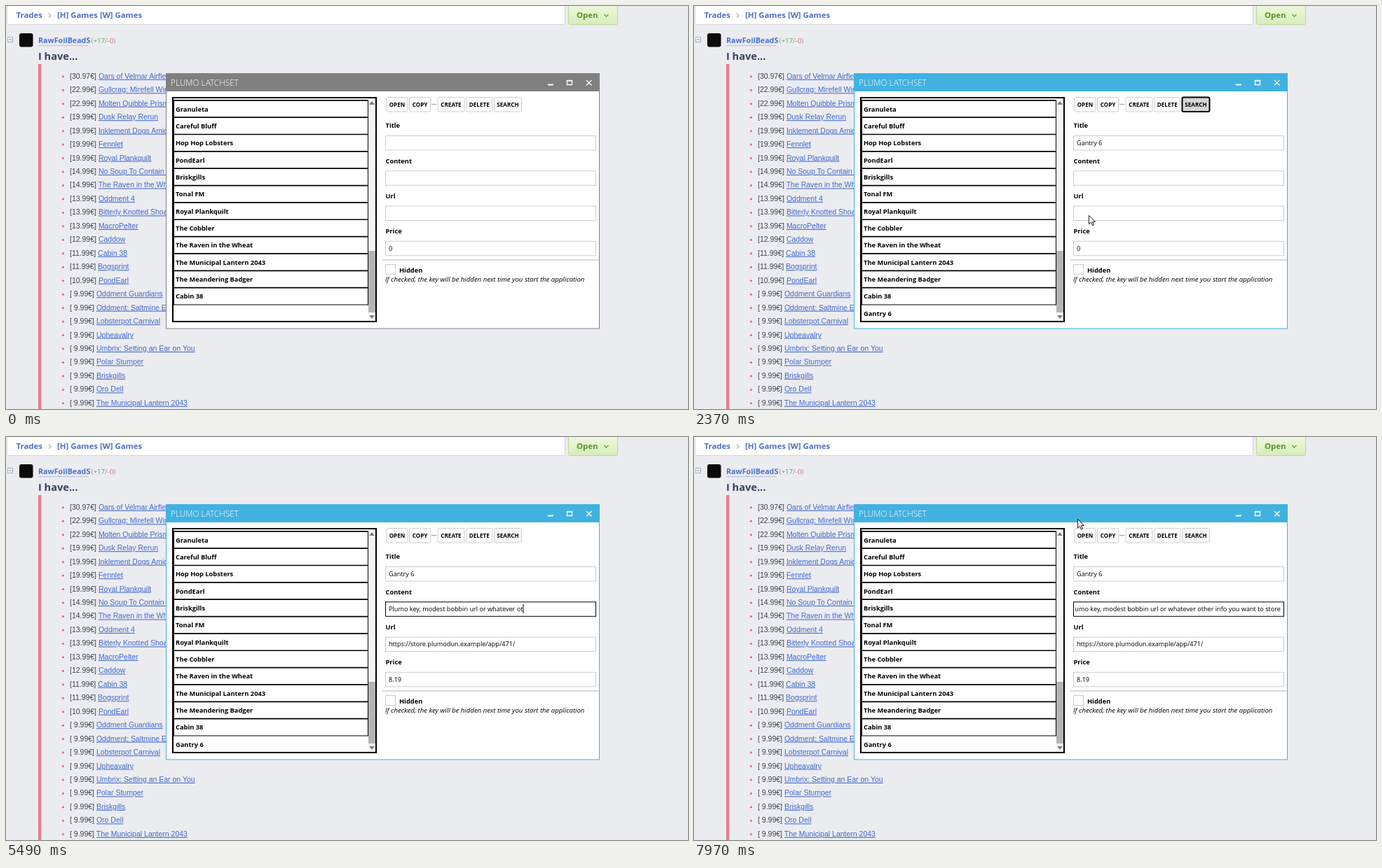
An HTML page for the animation above (8000 ms loop, 973 px wide and 576 px high).

```html
<!DOCTYPE html>
<html lang="en">
<head>
<meta charset="utf-8">
<title>Key manager</title>
<style>
  html, body { margin: 0; width: 100%; height: 100%; overflow: hidden; background: #ebecf0; }
  svg { display: block; --accent: #41b1e1; }
  text { white-space: pre; font: 9.15px "Open Sans", sans-serif; fill: #000; }
  .bold { font-weight: 700; font-size: 9.3px; }
  .button { font-weight: 700; font-size: 8.1px; text-anchor: middle; }
  .note { font-style: italic; font-size: 9.6px; }
  .caption { font-size: 11.8px; font-weight: 300; fill: #fff; }
  .page { font: 10.5px "Liberation Sans", Arial, sans-serif; fill: #3c424d; }
  .link { fill: #4268cd; text-decoration: underline; }
  .nav { font-size: 11.4px; font-weight: 700; fill: #4b6fca; }
  .user { font-size: 10.7px; font-weight: 700; fill: #4b6fca; }
  .votes { font-size: 9.7px; fill: #8a93a3; }
  .heading { font-size: 14.6px; font-weight: 700; fill: #36435c; }
</style>
</head>
<body>
<svg id="stage" width="973" height="576" viewBox="0 0 973 576"></svg>
<script>
const LOOP = 8000;
const TITLE = "Gantry 6";
const NOTE = "Plumo key, modest bobbin url or whatever other info you want to store";
const SEARCH_AT = 1810, FOUND_AT = 3160, ACTIVE_AT = 570;

const trades = [
  ["30.97", "Oars of Velmar Airfleet Collector's Edition"],
  ["22.99", "Gullcrag: Mirefell Winter"], ["22.99", "Molten Quibble Prism"],
  ["19.99", "Dusk Relay Rerun"], ["19.99", "Inklement Dogs Amid Us"],
  ["19.99", "Fennlet"], ["19.99", "Royal Plankquilt"],
  ["14.99", "No Soup To Contain Remade"], ["14.99", "The Raven in the Wheat"],
  ["13.99", "Oddment 4"], ["13.99", "Bitterly Knotted Shoals"],
  ["13.99", "MacroPelter"], ["12.99", "Caddow"], ["11.99", "Cabin 38"],
  ["11.99", "Bogsprint"], ["10.99", "PondEarl"],
  [" 9.99", "Oddment Guardians"], [" 9.99", "Oddment: Saltmine East"],
  [" 9.99", "Lobsterpot Carnival"], [" 9.99", "Upheavalry"],
  [" 9.99", "Umbrix: Setting an Ear on You"], [" 9.99", "Polar Stumper"],
  [" 9.99", "Briskgills"], [" 9.99", "Oro Dell"],
  [" 9.99", "The Municipal Lantern 2043"],
];
const keys = ["Granuleta", "Careful Bluff", "Hop Hop Lobsters", "PondEarl", "Briskgills",
  "Tonal FM", "Royal Plankquilt", "The Cobbler", "The Raven in the Wheat",
  "The Municipal Lantern 2043", "The Meandering Badger", "Cabin 38"];
const buttons = [["OPEN", 543, 30], ["COPY", 575.5, 30], ["CREATE", 616, 38],
  ["DELETE", 657, 36.5], ["SEARCH", 696.5, 39]];
const fields = [["Title", 185.5], ["Content", 235.8], ["Url", 286], ["Price", 336.3]];

const text = (x, y, cls, str, attrs = "") => `<text x="${x}" y="${y}" class="${cls}" ${attrs}>${str}</text>`;
const rect = (x, y, w, h, fill, attrs = "") =>
  `<rect x="${x}" y="${y}" width="${w}" height="${h}" fill="${fill}" ${attrs}/>`;
const path = (d, stroke, attrs = "") => `<path d="${d}" stroke="${stroke}" fill="none" ${attrs}/>`;

function drawPage() {
  const rows = trades.map(([price, name], i) => {
    const y = 103.8 + 19.46 * i;
    return `<circle cx="81.3" cy="${y - 3}" r="1.5" fill="#e0616f"/>` +
      text(91, y, "page", `[${price}€] <tspan class="link">${name}</tspan>`);
  });
  return `<linearGradient id="green" x2="0" y2="1"><stop stop-color="#f3f8e6"/><stop offset="1" stop-color="#d5edb8"/></linearGradient>` +
    rect(0, 0, 973, 576, "#ebecf0") +
    rect(1.5, -3.5, 796, 30, "#fff", 'stroke="#d3d6de" rx="2"') +
    text(14.5, 17, "nav", "Trades") + path("M61 10.5l3 3-3 3", "#6b7486") +
    text(73, 17, "nav", "[H] Games [W] Games") +
    rect(802.5, -3.5, 70, 30, "url(#green)", 'stroke="#bcd79c" rx="2"') +
    text(814, 17, "nav", "Open", 'style="fill:#57941c"') + path("M853.5 12l3 3 3-3", "#6ba338", 'stroke-width="1.3"') +
    rect(2.5, 44.5, 7, 7, "#f2f3f6", 'stroke="#a9b0be"') + path("M4 48h4", "#8a93a3") +
    rect(19, 39, 19.5, 19.5, "#0b0b0c", 'rx="3"') +
    text(46, 53, "user", "RawFoilBeadS") + path("M46 56.5h72", "#7f97d8", 'stroke-dasharray="1 1"') +
    text(121.5, 53, "votes", '(<tspan fill="#62a34c">+17</tspan>/<tspan fill="#dd6d78">-0</tspan>)') +
    text(46, 77, "heading", "I have...") +
    rect(46, 83, 4.5, 493, "#e5808a") + rows.join("");
}

function drawKeyList() {
  const rowY = i => 134.8 + 24.35 * i;
  return path("M237 131H529M237 451H529M238 130V452M528 130V452", "#000", 'stroke-width="2"') +
    path("M516.5 135V427M239.5 135V427", "#000") +
    keys.map((name, i) => path(`M238 ${rowY(i)}H517`, "#000", 'stroke-width="1.7"') +
      text(242, rowY(i) + 15.7, "bold", name)).join("") +
    path(`M238 ${rowY(12)}H517`, "#000", 'stroke-width="1.2"') +
    text(242, rowY(12) + 15.7, "bold", TITLE, 'id="newKey"') +
    rect(517, 132, 10, 318, "#f4f4f4") + rect(517, 350, 10, 88, "#b4b4b4") +
    '<path d="M518 141l4-5 4 5zM518 442l4 5 4-5z" fill="#808080"/>';
}

function drawWindow() {
  return rect(228.5, 96.5, 618, 364.5, "#fff", 'stroke="var(--accent)"') +
    rect(228, 96, 619, 26, "var(--accent)") + text(235, 114.3, "caption", "PLUMO LATCHSET") +
    path("M773 112.5h8", "#fff", 'stroke-width="2"') +
    path("M800.5 106.5h7v6h-7zM800 107h8M828 106l7.5 7.5M835.5 106l-7.5 7.5", "#fff", 'stroke-width="1.3"') +
    drawKeyList() +
    buttons.map(([name, x, w]) => rect(x, 130.5, w, 20.5, "#fff", `id="${name}" stroke="#ccc" rx="2"`) +
      text(x + w / 2, 144.3, "button", name)).join("") +
    path("M607 140.5h7", "#999") +
    fields.map(([name, y]) => text(541.5, y - 11.3, "bold", name) +
      rect(541.5, y, 300, 20.5, "#fff", `id="${name}" stroke="#ccc"`) +
      `<svg x="543.5" y="${y}" width="296" height="21">${text(2.5, 13.3, "", "", `id="${name}Text"`)}</svg>`).join("") +
    path("M537 363H846", "#b5b5b5") + rect(541.5, 369.5, 14, 14, "#fff", 'stroke="#ccc"') +
    text(561, 380.6, "bold", "Hidden") +
    text(541, 394.4, "note", "If checked, the key will be hidden next time you start the application") +
    rect(0, 0, 1, 13, "#000", 'id="caret"') +
    `<g id="arrow"><path d="M.5.5v12.5l3-2.7 2 4.7 2-.9-2-4.5h4z" fill="#fff" stroke="#000" stroke-width=".9"/></g>` +
    `<g id="beam">${path("M-2.5-6.5h2l.5.5.5-.5h2M0-6v12M-2.5 6.5h2l.5-.5.5.5h2", "#000")}</g>`;
}

const stage = document.getElementById("stage");
stage.innerHTML = drawPage() + drawWindow();
const $ = id => document.getElementById(id);
const set = (id, attr, value) => $(id).setAttribute(attr, value);
const show = (id, on) => set(id, "visibility", on ? "visible" : "hidden");

// Interpolates rows of [time, ...values].
function sample(track, t, ease = k => k) {
  if (t <= track[0][0]) return track[0].slice(1);
  const next = track.findIndex(key => key[0] > t);
  if (next < 0) return track.at(-1).slice(1);
  const a = track[next - 1], b = track[next];
  const k = ease((t - a[0]) / (b[0] - a[0]));
  return a.slice(1).map((v, i) => v + (b[i + 1] - v) * k);
}
const smooth = k => k * k * (3 - 2 * k);

const mouse = [[100, 874, 540], [480, 597, 192], [1380, 597, 192], [1690, 716, 142],
  [1850, 716, 142], [2360, 563, 299], [2570, 568, 264], [2900, 565, 249], [3200, 565, 249],
  [7150, 566, 259], [7300, 566, 259], [7480, 557, 298], [7960, 547, 117]];
const titleTyping = [[860, 0], [1340, 8]];
const noteTyping = [[3200, 0], [3300, 1], [3930, 13], [4560, 27], [4735, 30],
  [5610, 46], [6510, 61], [6540, 62], [6900, 69]];
const typed = (str, track, t) => str.slice(0, Math.floor(sample(track, t)[0]));

function render(t) {
  const found = t >= FOUND_AT, searching = t >= SEARCH_AT && !found;
  const focus = found ? "Content" : t >= ACTIVE_AT && !searching ? "Title" : "";
  const [mx, my] = sample(mouse, t, smooth);
  const within = (y, h, x, w) => mx >= x && mx <= x + w && my >= y && my <= y + h;
  const mouseOn = t >= 100 && !(t >= 900 && t < 1380) && !(t >= 3200 && t < 7150);

  stage.style.setProperty("--accent", t < ACTIVE_AT ? "#808080" : "#41b1e1");
  $("TitleText").textContent = typed(TITLE, titleTyping, t);
  $("ContentText").textContent = typed(NOTE, noteTyping, t);
  $("UrlText").textContent = found ? "https://store.plumodun.example/app/471/" : "";
  $("PriceText").textContent = found ? "8.19" : "0";
  show("newKey", t >= SEARCH_AT);

  let overField = false;
  for (const [name, y] of fields) {
    const hover = mouseOn && !searching && within(y, 20.5, 541, 301);
    overField ||= hover;
    set(name, "stroke", name === focus ? "#000" : hover ? "#7f7f7f" : "#ccc");
  }
  for (const [name, x, w] of buttons) {
    const pressed = searching && name === "SEARCH";
    const hover = mouseOn && !searching && within(130, 21, x, w);
    set(name, "fill", pressed ? "#d6d6d6" : hover ? "#e4e4e4" : found && name === "SEARCH" ? "#f7f7f7" : "#fff");
    set(name, "stroke", pressed ? "#000" : "#ccc");
    set(name, "stroke-width", pressed ? 2 : 1);
  }

  // Long text scrolls so that its end stays in view.
  const noteWidth = $("ContentText").getComputedTextLength();
  set("ContentText", "x", Math.min(2.5, 293.5 - noteWidth));
  const titleWidth = $("TitleText").getComputedTextLength();
  if (focus === "Title") {
    set("caret", "x", 546 + titleWidth);
    set("caret", "y", 188.5);
  } else {
    set("caret", "x", Math.min(546 + noteWidth, 837));
    set("caret", "y", 239);
  }
  show("caret", focus === "Title" ? (t - ACTIVE_AT) % 1060 < 530
    : found && (t - 160) % 1060 < 385);

  set("arrow", "transform", `translate(${mx} ${my})`);
  set("beam", "transform", `translate(${mx} ${my})`);
  show("arrow", mouseOn && !overField);
  show("beam", mouseOn && overField);
}

function tick() {
  render(performance.now() % LOOP);
  requestAnimationFrame(tick);
}
tick();
</script>
</body>
</html>
```
